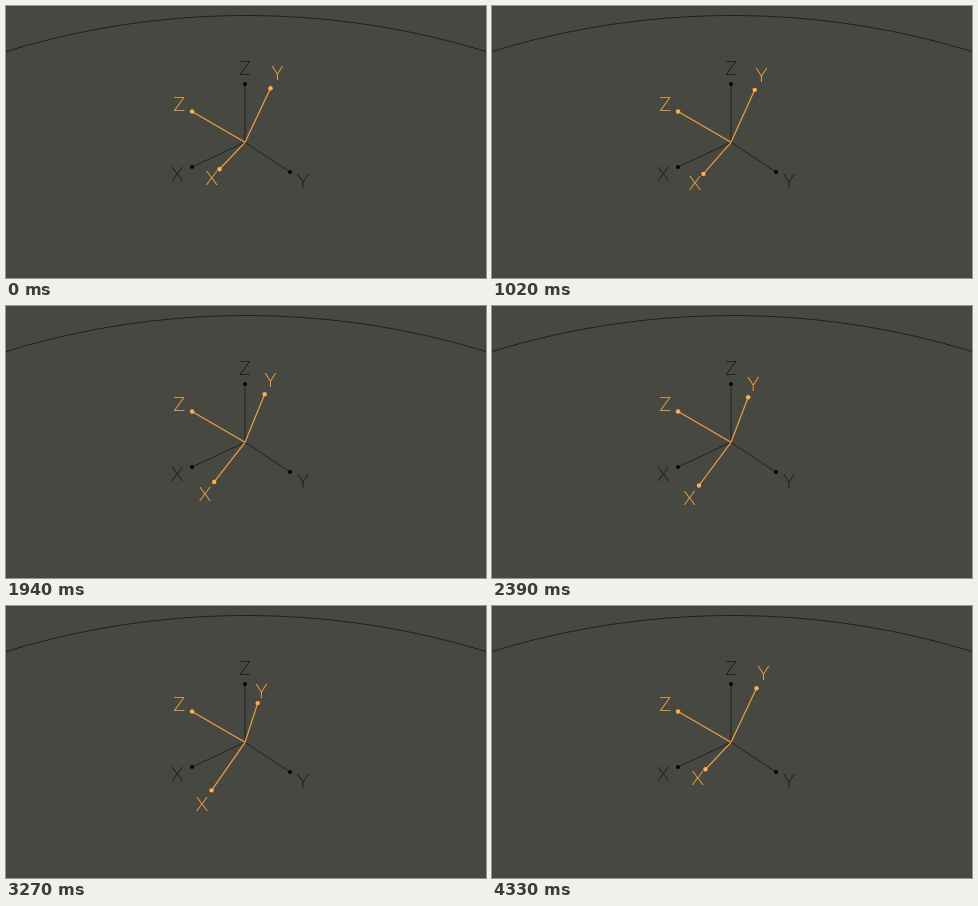
Animation of 480 by 272 pixels, one loop 4.36 s. Source, as an HTML page with a canvas:

```html
<!DOCTYPE html>
<html lang="en">
<head>
<meta charset="utf-8">
<title>Rotating axes</title>
<style>
  html, body { margin: 0; height: 100%; overflow: hidden; background: #484843; }
  canvas { display: block; }
</style>
</head>
<body>
<canvas id="stage" width="480" height="272"></canvas>
<script>
const ctx = document.getElementById('stage').getContext('2d');
const LOOP = 4360, TURN = 4000, RESET = 4325;
const ORIGIN = [239, 136.3], CAMERA = 400;

// Axis tips: x right, y down, z towards the camera
const fixed = { X: [-48.6, 22.7, 33], Y: [40.5, 26.8, 40], Z: [0, -53.3, 34] };
const start = { X: [-21.7, 22.9, 60], Y: [23.6, -50, 30], Z: [-54, -31.4, -8] };

const mix = (a, p, b, q) => a.map((v, i) => v * p + b[i] * q);

function project([x, y, z], scale = 1) {
  const k = scale / (1 - z * scale / CAMERA);
  return [ORIGIN[0] + x * k, ORIGIN[1] + y * k];
}

function drawAxes(axes, line, dot, radius) {
  for (const [name, tip] of Object.entries(axes)) {
    const [x, y] = project(tip), [lx, ly] = project(tip, 1.25);
    ctx.strokeStyle = line;
    ctx.beginPath();
    ctx.moveTo(...ORIGIN);
    ctx.lineTo(x, y);
    ctx.stroke();
    ctx.fillStyle = dot;
    ctx.beginPath();
    ctx.arc(x, y, radius, 0, 2 * Math.PI);
    ctx.fill();
    ctx.fillStyle = line;
    ctx.fillText(name, lx, ly + 7);
  }
}

function turned(angle) {
  const c = Math.cos(angle), s = Math.sin(angle);
  return {
    X: mix(start.X, c, start.Y, -s),
    Y: mix(start.Y, c, start.X, s),
    Z: start.Z
  };
}

function draw(now) {
  const t = now % LOOP;
  const u = t < RESET ? Math.min(t / TURN, 1) : 0;
  const angle = Math.PI / 6 * u * u * (3 - 2 * u);

  ctx.fillStyle = '#484843';
  ctx.fillRect(0, 0, 480, 272);
  ctx.font = '300 20px Lato, Inter, sans-serif';
  ctx.textAlign = 'center';

  // Horizon
  ctx.lineWidth = 1;
  ctx.strokeStyle = '#1f1f22';
  ctx.beginPath();
  ctx.arc(240, 827.5, 818, -2, -1);
  ctx.stroke();

  drawAxes(fixed, '#1f1f20', '#040404', 2);
  ctx.lineWidth = 1.2;
  drawAxes(turned(angle), '#eda040', '#ffb048', 2.2);
  requestAnimationFrame(() => draw(performance.now()));
}
draw(performance.now());
</script>
</body>
</html>
```
